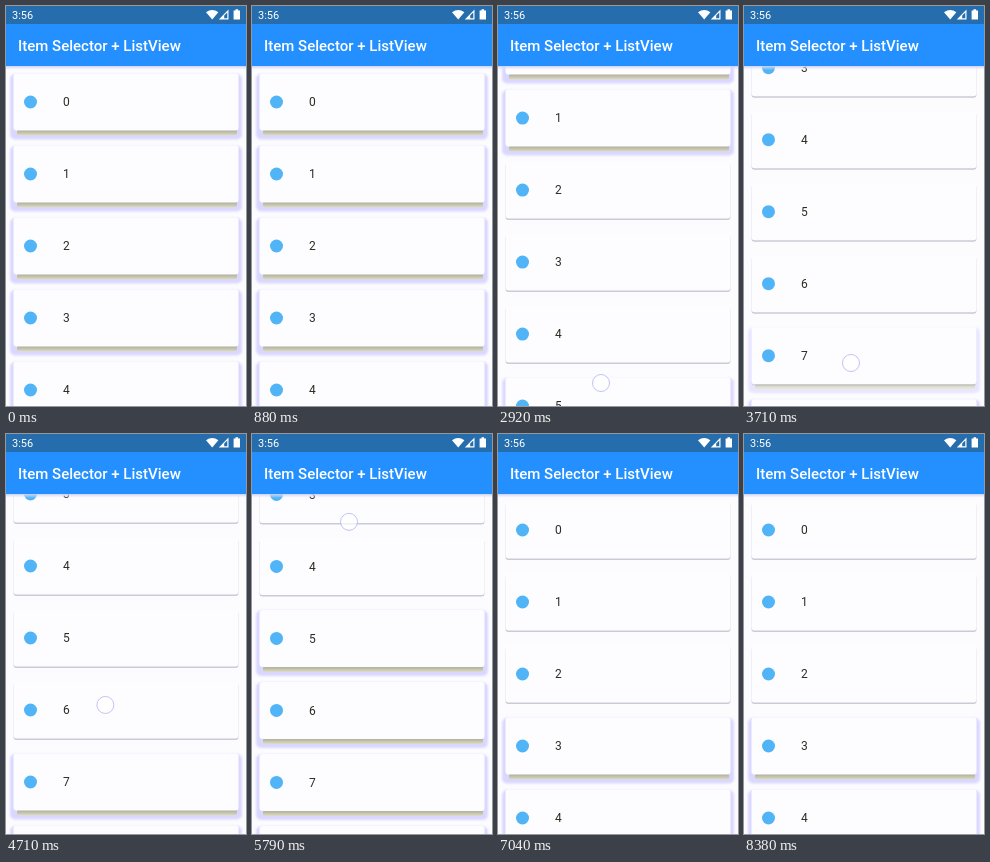
Animation, 240 px wide and 400 px high, one loop 8.71 s. Source, as an HTML page:

```html
<!DOCTYPE html>
<html lang="en">
<head>
<meta charset="utf-8">
<title>Item Selector</title>
<style>
  html, body { margin: 0; width: 100%; height: 100%; overflow: hidden; background: #fcfcff; }
  svg { display: block; width: 100%; height: 100%; }
  text { font-family: Roboto, Arial, sans-serif; }
</style>
</head>
<body>
<svg viewBox="0 0 240 400">
  <defs>
    <filter id="soft" x="-10%" y="-30%" width="120%" height="160%"><feGaussianBlur stdDeviation="1.1"/></filter>
    <filter id="crisp" x="-10%" y="-100%" width="120%" height="300%"><feGaussianBlur stdDeviation="0.5"/></filter>
    <linearGradient id="strip" x1="0" y1="0" x2="0" y2="1">
      <stop offset="0" stop-color="#a6a69c"/>
      <stop offset="0.4" stop-color="#bdbca6"/>
      <stop offset="1" stop-color="#dedcc6"/>
    </linearGradient>
    <linearGradient id="barShadow" x1="0" y1="0" x2="0" y2="1">
      <stop offset="0" stop-color="#ccd0f2"/>
      <stop offset="1" stop-color="#e4e4ff" stop-opacity="0"/>
    </linearGradient>
  </defs>
  <rect width="240" height="400" fill="#fcfcff"/>
  <g id="list"></g>
  <rect y="60" width="240" height="4" fill="url(#barShadow)"/>
  <rect width="240" height="60" fill="#2490ff"/>
  <rect width="240" height="18" fill="#256dac"/>
  <text x="6" y="13" font-size="11" fill="#fff">3:56</text>
  <text x="12" y="44.5" font-size="15" font-weight="500" fill="#fff">Item Selector + ListView</text>
  <g fill="#fff">
    <path d="M200 6.2Q206.2 1.6 212.4 6.2L206.2 13.4Z"/>
    <path d="M222.5 3.5V13.4H212.8Z M221.3 6.4L218.2 9.6V12.2H221.3Z" fill-rule="evenodd"/>
    <path d="M229.5 3.2h2.6v1.2h1.9v9h-6.4v-9h1.9z"/>
  </g>
  <circle id="touch" r="8.5" fill="#fff" fill-opacity="0.68" stroke="#b4b4ee" stroke-opacity="0.8"/>
</svg>
<script>
const LOOP = 8710, TOP = 60, PITCH = 72, ITEMS = 10;
const ANCHOR = 2, PRESS = 2170, RELEASE = 6590;

// Progress from 0 to 1 between two times.
const ramp = (t, from, to) => Math.min(1, Math.max(0, (t - from) / (to - from)));

// The list scrolls down twice while the finger is near the bottom, then all the way back.
const scrollAt = t => 60 * ramp(t, 2660, 2940) + 192 * ramp(t, 3250, 3715) - 252 * ramp(t, 5790, 6330);

const fingerX = t => 103 + 4 * ramp(t, 3250, 3710) - 10 * ramp(t, 4170, 4880);
const fingerY = t => 240 + 137 * ramp(t, 2250, 2820) - 20 * ramp(t, 3250, 3710)
  - 159 * ramp(t, 4170, 5170) - 148 * ramp(t, 5340, 5946);

// Everything between the pressed item and the one under the finger is selected.
function isSelected(item, t) {
  if (t < PRESS) return false;
  const row = Math.floor((fingerY(t) - TOP + scrollAt(t)) / PITCH);
  return item >= Math.min(ANCHOR, row) && item <= Math.max(ANCHOR, row);
}

// A card's elevation follows its selection with a short lag and fade.
function lift(item, t) {
  const lag = 60, step = 10, samples = 14;
  let raised = 0;
  for (let k = 0; k < samples; k++) raised += !isSelected(item, t - lag - k * step);
  return raised / samples;
}

const list = document.getElementById('list');
const touch = document.getElementById('touch');

list.innerHTML = Array.from({ length: ITEMS }, (_, i) => `
  <g transform="translate(0 ${TOP + i * PITCH})">
    <rect x="7.5" y="9" width="225" height="57" rx="3" fill="#cacad8" filter="url(#crisp)"/>
    <g class="raised">
      <rect x="4" y="8" width="232" height="65.5" rx="5" fill="#dad7ff" filter="url(#soft)"/>
      <rect x="11" y="63.5" width="220" height="6" rx="2" fill="url(#strip)" filter="url(#crisp)"/>
    </g>
    <rect x="7.5" y="7.5" width="225" height="57" rx="3" fill="#fdfdff"/>
    <circle cx="24.5" cy="36" r="6.5" fill="#50b4f6"/>
    <text x="57" y="40.3" font-size="12" fill="#2c2c24">${i}</text>
  </g>`).join('');
const raised = [...list.querySelectorAll('.raised')];

function draw(t) {
  list.setAttribute('transform', `translate(0 ${-scrollAt(t)})`);
  raised.forEach((shadow, i) => shadow.setAttribute('opacity', lift(i, t)));
  touch.setAttribute('cx', fingerX(t));
  touch.setAttribute('cy', fingerY(t));
  touch.setAttribute('visibility', t >= PRESS && t < RELEASE ? 'visible' : 'hidden');
}

const start = performance.now();
function tick() {
  draw((performance.now() - start) % LOOP);
  requestAnimationFrame(tick);
}
tick();
</script>
</body>
</html>
```
